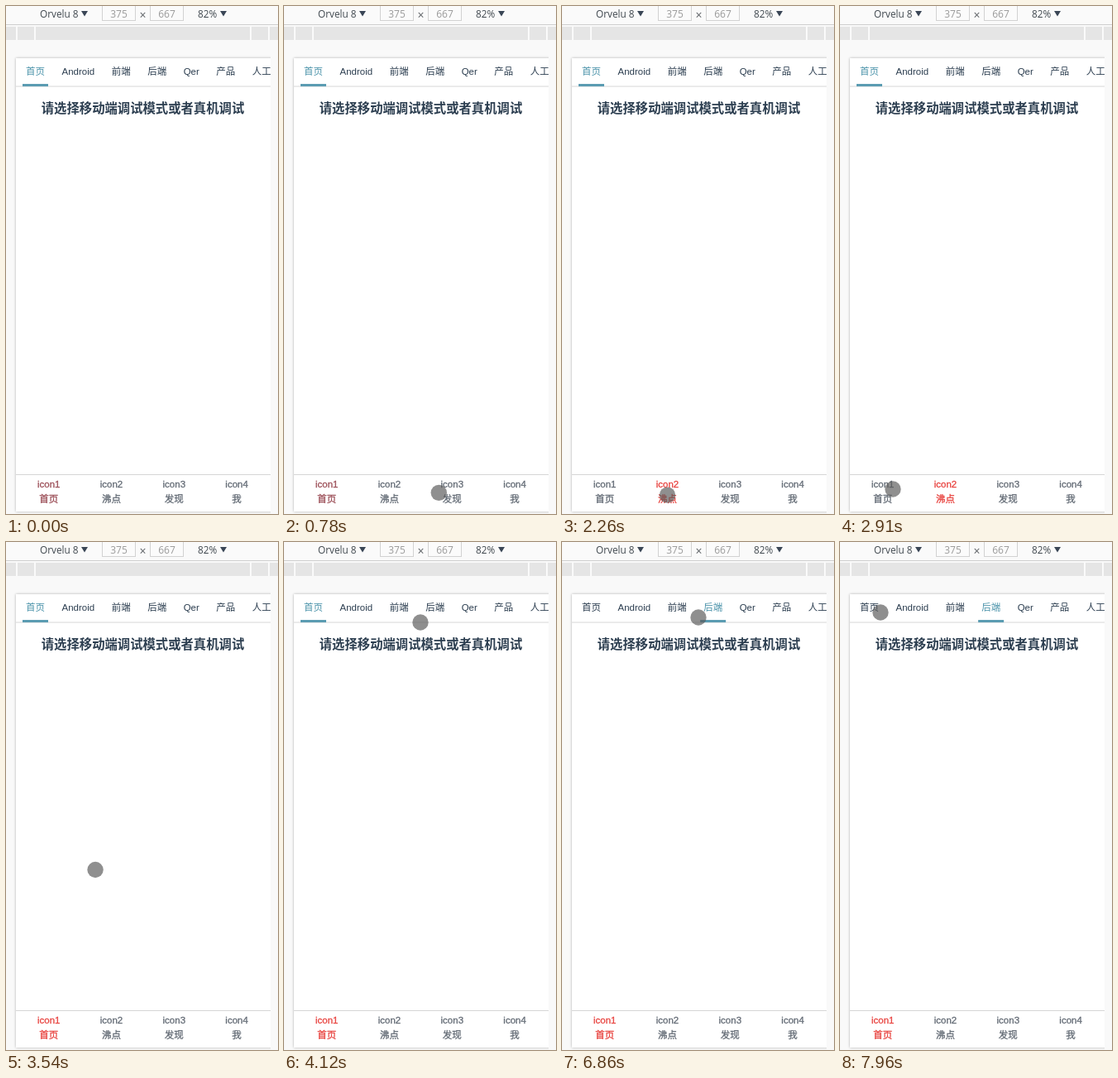
Animation of 329x613 px, one loop 8000 ms. Source, as an HTML page with a canvas:

```html
<!DOCTYPE html>
<html lang="zh">
<head>
<meta charset="utf-8">
<title>Mobile tabs</title>
<style>
html, body { margin: 0; width: 100%; height: 100%; overflow: hidden; background: #f9f9f9; }
canvas { display: block; width: 329px; height: 613px; }
</style>
</head>
<body>
<canvas id="stage"></canvas>
<script>
const W = 329, H = 613, LOOP = 8000;
const canvas = document.getElementById('stage');
const ctx = canvas.getContext('2d');
const dpr = window.devicePixelRatio || 1;
canvas.width = W * dpr;
canvas.height = H * dpr;

const SANS = '"Liberation Sans", "Noto Sans CJK SC", "Noto Sans CJK", sans-serif';
const UI = '"Open Sans", "Noto Sans", sans-serif';
const SMALL = '11.5px ' + SANS, BAR = '11.8px ' + UI;
const INK = '#2c3e50', GREY = '#626a74', RED = '#e8433f', DULL_RED = '#9c4f58';
const TEAL = '#4b93aa', LINE = '#5b9cb2';

const items = ['首页', '沸点', '发现', '我'];
const ITEM_LEFT = 13.8, ITEM_W = 75.8;

// Tabs flow from left to right with an even gap.
const TAB_GAP = 20.5;
ctx.font = SMALL;
let nextX = 24;
const tabs = ['首页', 'Android', '前端', '后端', 'Qer', '产品', '人工智能'].map(label => {
  const tab = { label, x: nextX, w: ctx.measureText(label).width };
  nextX += tab.w + TAB_GAP;
  return tab;
});

// The pointer rests between eased moves.
const home = { x: 256, y: 624 };
const moves = [
  { from: 140, to: 920, x: 181, y: 584 },
  { from: 1010, to: 1750, x: 153, y: 593 },
  { from: 2010, to: 2720, x: 64, y: 583 },
  { from: 2980, to: 3240, x: 99, y: 443 },
  { from: 3420, to: 3940, x: 165, y: 97 },
  { from: 4200, to: 4570, x: 139, y: 85 },
  { from: 4900, to: 5410, x: 229, y: 85 },
  { from: 5720, to: 6300, x: 165, y: 91 },
  { from: 6860, to: 7250, x: 133, y: 96 },
  { from: 7320, to: 7960, x: 49, y: 85 }
];
const taps = [1010, 2010, 2980, 4900, 5720, 6540];

const clamp = v => Math.min(1, Math.max(0, v));
const ease = k => k * k * (3 - 2 * k);

function pointerAt(t) {
  let { x, y } = home;
  for (const m of moves) {
    const k = ease(clamp((t - m.from) / (m.to - m.from)));
    x += (m.x - x) * k;
    y += (m.y - y) * k;
  }
  return { x, y };
}

// Each tap selects whatever lies under the pointer at that moment.
function stateAt(t) {
  const state = { tab: 0, item: 0, itemColor: DULL_RED };
  for (const tap of taps.filter(time => time <= t)) {
    const { x, y } = pointerAt(tap);
    if (y > 565) {
      state.item = Math.floor((x - ITEM_LEFT) / ITEM_W);
      state.itemColor = RED;
    } else {
      state.tab = tabs.findIndex(tab => x < tab.x + tab.w + TAB_GAP / 2);
    }
  }
  return state;
}

function rect(x, y, w, h, color) {
  ctx.fillStyle = color;
  ctx.fillRect(x, y, w, h);
}

function text(str, x, y, font, color, align = 'left') {
  ctx.font = font;
  ctx.fillStyle = color;
  ctx.textAlign = align;
  ctx.fillText(str, x, y);
}

function arrow(x) {
  ctx.fillStyle = '#3a4656';
  ctx.beginPath();
  ctx.moveTo(x, 6);
  ctx.lineTo(x + 8, 6);
  ctx.lineTo(x + 4, 12.5);
  ctx.fill();
}

function field(x, value) {
  rect(x, -1, 41, 19, '#d2d2d2');
  rect(x + 1, 0, 39, 17, '#fbfbfb');
  text(value, x + 20.5, 14, '12px ' + UI, '#9a9a9a', 'center');
}

function toolbar() {
  rect(0, 0, W, 22, '#fafafa');
  rect(0, 22, W, 1, '#cfcfcf');
  text('Orvelu 8', 41, 14, BAR, '#40484f');
  arrow(91);
  field(116, '375');
  text('×', 165.5, 16, '14px ' + UI, '#606468', 'center');
  field(174, '667');
  text('82%', 232, 14, BAR, '#40484f');
  arrow(259);
  rect(0, 25, W, 16, '#e5e5e5');
  for (const x of [12, 34, 295, 317]) rect(x, 25, 2, 16, '#fafafa');
}

function nav(active) {
  rect(12, 96, 308, 2, '#ebebeb');
  tabs.forEach(({ label, x, w }, i) => {
    text(label, x, 83, SMALL, i === active ? TEAL : INK);
    if (i === active) rect(x - 4, 94, w + 8, 3, LINE);
  });
}

function footer(active, activeColor) {
  rect(12, 565, 308, 1, '#d6d6d6');
  ctx.lineWidth = 0.3;
  items.forEach((label, i) => {
    const color = i === active ? activeColor : GREY;
    const x = ITEM_LEFT + ITEM_W * (i + 0.5);
    ctx.strokeStyle = color;
    [`icon${i + 1}`, label].forEach((line, row) => {
      const y = 581 + 18 * row;
      text(line, x, y, SMALL, color, 'center');
      ctx.strokeText(line, x, y);
    });
  });
}

function page(state) {
  ctx.save();
  ctx.beginPath();
  ctx.rect(0, 42, 320, H);
  ctx.clip();
  ctx.shadowColor = 'rgba(0,0,0,.3)';
  ctx.shadowBlur = 3 * dpr;
  rect(12, 63, 312, 547, '#fff');
  ctx.shadowColor = 'transparent';
  nav(state.tab);
  text('请选择移动端调试模式或者真机调试', 165.5, 129, 'bold 15.35px ' + SANS, INK, 'center');
  footer(state.item, state.itemColor);
  ctx.restore();
}

function pointer({ x, y }) {
  ctx.fillStyle = 'rgba(88,88,88,.67)';
  ctx.beginPath();
  ctx.arc(x, y, 9.7, 0, Math.PI * 2);
  ctx.fill();
}

function draw(t) {
  ctx.setTransform(dpr, 0, 0, dpr, 0, 0);
  rect(0, 0, W, H, '#f9f9f9');
  toolbar();
  page(stateAt(t));
  pointer(pointerAt(t));
}

const start = performance.now();
function tick() {
  draw((performance.now() - start) % LOOP);
  requestAnimationFrame(tick);
}
tick();
</script>
</body>
</html>
```
